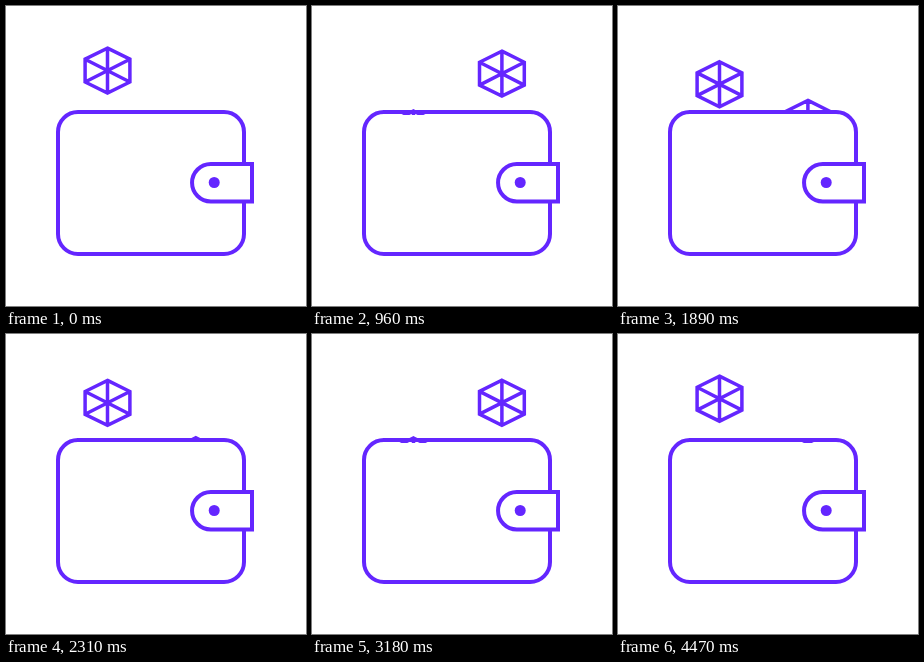
Animation of 300x300 px, one loop 4500 ms. Source, as an HTML page:

```html
<!DOCTYPE html>
<html lang="en">
<head>
<meta charset="utf-8">
<title>Wallet</title>
<style>
html, body { margin: 0; width: 100%; height: 100%; overflow: hidden; background: #fff; }
svg { display: block; width: 100%; height: 100%; }
</style>
</head>
<body>
<svg viewBox="0 0 300 300" fill="none" stroke="#6426ff" stroke-width="4">
  <defs>
    <path id="block" stroke-width="3.5" d="M0 -22.5L22.4 -11.4V11.4L0 22.5L-22.4 11.4V-11.4ZM0 -22.5V22.5M22.4 -11.4L-22.4 11.4M-22.4 -11.4L22.4 11.4"/>
    <clipPath id="clipL"><rect id="windowL" width="150" height="106"/></clipPath>
    <clipPath id="clipR"><rect id="windowR" x="150" width="150" height="106"/></clipPath>
  </defs>
  <g clip-path="url(#clipL)"><use id="blockL" href="#block"/></g>
  <g clip-path="url(#clipR)"><use id="blockR" href="#block"/></g>
  <rect x="52" y="106" width="186" height="142" rx="20"/>
  <path fill="#fff" d="M246 158H204.8A18.75 18.75 0 0 0 204.8 195.5H246Z"/>
  <circle cx="208.2" cy="176.5" r="5.5" fill="#6426ff" stroke="none"/>
</svg>
<script>
const LOOP = 4500, HALF = 1125;
const HIGH = 64.6, LOW = 130.6;
const $ = id => document.getElementById(id);

// Cubic Bezier easing with control points (x1, 0) and (x2, 1)
function ease(u, x1, x2) {
  let lo = 0, hi = 1;
  for (let i = 0; i < 24; i++) {
    const s = (lo + hi) / 2, r = 1 - s;
    if (3 * r * r * s * x1 + 3 * r * s * s * x2 + s * s * s < u) lo = s;
    else hi = s;
  }
  return lo * lo * (3 - 2 * lo);
}

function place(side, x, p, u, falling) {
  const y = falling ? HIGH + (LOW - HIGH) * p : LOW - (LOW - HIGH) * p;
  $('block' + side).setAttribute('transform', `translate(${x} ${y.toFixed(2)})`);
  // The tip peeks below the rim as a block settles
  $('window' + side).setAttribute('height', falling && u > 0.8 ? 109 : 106);
}

function draw(ms) {
  const t = ms % LOOP % (2 * HALF);
  const first = t < HALF;
  const u = (t % HALF) / HALF;
  const p = first ? ease(u, 0.03, 0.66) : ease(u, 0.35, 0.6);
  place('L', 101.5, p, u, first);
  place('R', 189.9, p, u, !first);
}

const start = performance.now();
function tick() {
  draw(performance.now() - start);
  requestAnimationFrame(tick);
}
tick();
</script>
</body>
</html>
```
